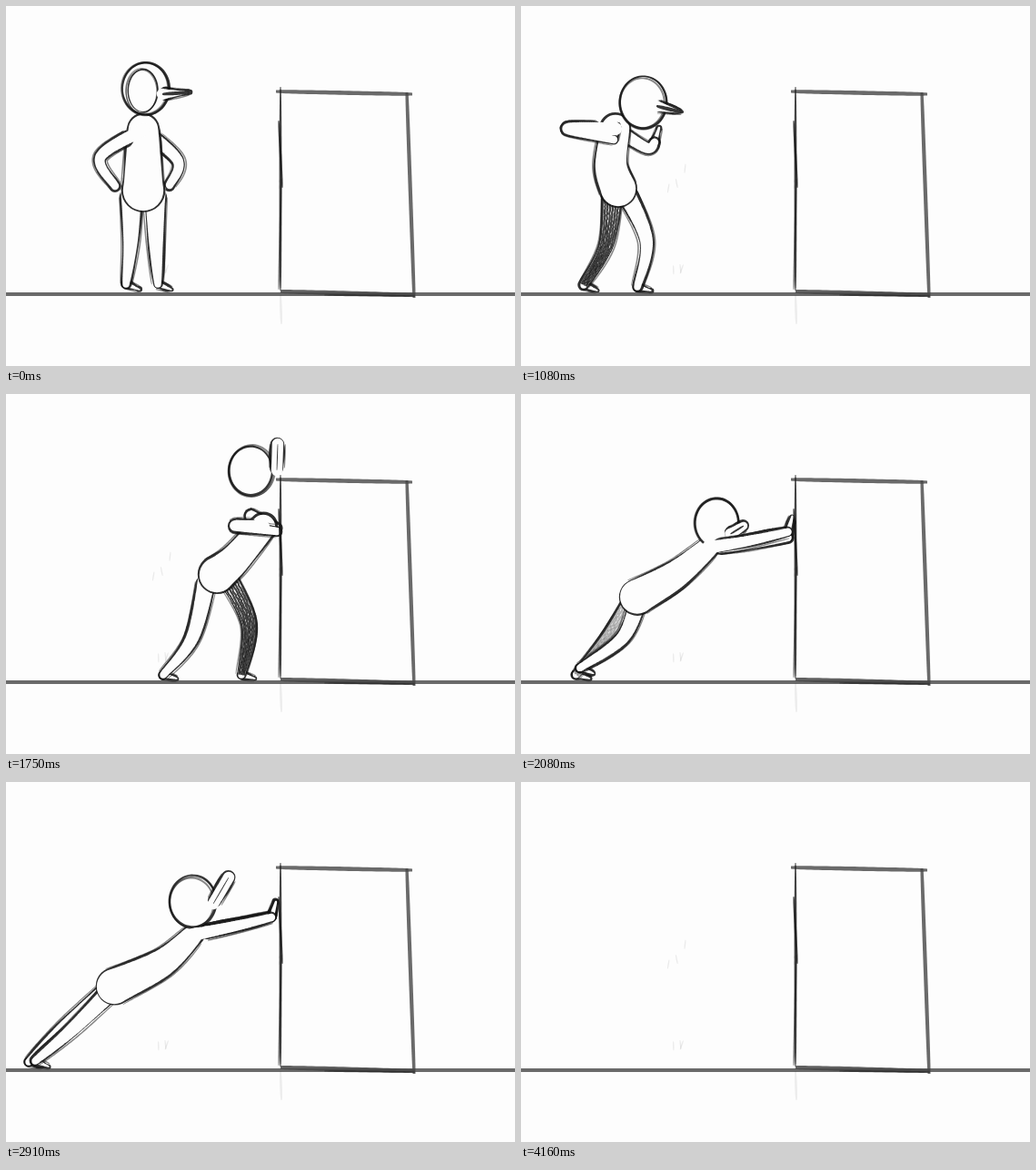
Animation of 560x396 px, one loop 4.66 s. Source, as an HTML page with a canvas:

```html
<!DOCTYPE html>
<html lang="en">
<head>
<meta charset="utf-8">
<title>Pushing the box</title>
<style>
html, body { margin: 0; width: 100%; height: 100%; overflow: hidden; background: #fdfdfd; }
canvas { display: block; width: 100vw; height: 100vh; }
</style>
</head>
<body>
<canvas id="stage" width="560" height="396"></canvas>
<script>
const ctx = document.getElementById('stage').getContext('2d');
const LOOP = 4660;
const PAPER = '#fdfdfd';
const ink = alpha => `rgba(20,20,20,${alpha})`;
const grey = alpha => `rgba(70,70,70,${alpha})`;

let seed = 1;
const random = () => (seed = (seed * 16807) % 2147483647) / 2147483647;
const jitter = size => (random() - 0.5) * 2 * size;

// Blends numbers, arrays and whole poses; t may overshoot 1.
function mix(a, b, t) {
  if (typeof a === 'number') return a + (b - a) * t;
  if (Array.isArray(a)) return a.map((v, i) => mix(v, b[i], t));
  return Object.fromEntries(Object.keys(a).map(k => [k, mix(a[k], b[k], t)]));
}

// ---- Pen ----

// Catmull-Rom curve through the points.
function smooth(points, steps = 36) {
  const at = i => points[Math.max(0, Math.min(points.length - 1, i))];
  const out = [];
  for (let i = 0; i < points.length - 1; i++) {
    const [a, b, c, d] = [at(i - 1), at(i), at(i + 1), at(i + 2)];
    for (let k = 0; k < steps; k++) {
      const t = k / steps;
      out.push([0, 1].map(n => 0.5 * (2 * b[n] + (c[n] - a[n]) * t
        + (2 * a[n] - 5 * b[n] + 4 * c[n] - d[n]) * t * t
        + (3 * b[n] - a[n] - 3 * c[n] + d[n]) * t * t * t)));
    }
  }
  return out.concat([at(points.length - 1)]);
}

// Moves every point sideways by distance(t), t running from 0 to 1.
function offset(line, distance) {
  return line.map(([x, y], i) => {
    const a = line[Math.max(0, i - 1)], b = line[Math.min(line.length - 1, i + 1)];
    const length = Math.hypot(b[0] - a[0], b[1] - a[1]) || 1;
    const d = distance(i / (line.length - 1));
    return [x - (b[1] - a[1]) / length * d, y + (b[0] - a[0]) / length * d];
  });
}

// One brush mark, thinner towards its ends by the share given as taper.
function brush(line, width, color, taper = 0.7) {
  const half = t => width / 2 * (1 - taper + taper * Math.sqrt(Math.sin(Math.PI * t) + 1e-9));
  ctx.beginPath();
  [...offset(line, half), ...offset(line, t => -half(t)).reverse()].forEach(p => ctx.lineTo(...p));
  ctx.fillStyle = color;
  ctx.fill();
}

function sketchEllipse([cx, cy], rx, ry, width) {
  for (let pass = 0; pass < 3; pass++) {
    const start = random() * 6, dx = jitter(1), dy = jitter(1), grow = jitter(1.2);
    const ring = Array.from({ length: 60 }, (_, i) => {
      const a = start + i / 59 * 6.6;
      return [cx + dx + (rx + grow) * Math.cos(a), cy + dy + (ry + grow) * Math.sin(a)];
    });
    brush(ring, width * (pass ? 0.7 : 1), ink(pass ? 0.5 : 0.85));
  }
}

// A soft tube around a bone, left open over its first part so that it joins what lies below.
function tube(bone, [r0, r1], { open = 0, shade = 0 } = {}) {
  const line = smooth(bone);
  const radius = t => r0 + (r1 - r0) * t;
  const phase = random() * 6;
  const discs = (extra, from, dx = 0, dy = 0) => {
    const path = new Path2D();
    line.forEach(([x, y], i) => {
      const t = i / (line.length - 1), r = Math.max(0.3, radius(t) + extra(t));
      if (t < from) return;
      path.moveTo(x + dx + r, y + dy);
      path.arc(x + dx, y + dy, r, 0, 7);
    });
    return path;
  };
  ctx.fillStyle = ink(0.88);
  ctx.fill(discs(t => 1.3 + 0.6 * Math.sin(t * 7 + phase), open, jitter(0.7), jitter(0.7)));
  const visible = line.slice(Math.floor(line.length * open));
  [-1, 1].forEach(side => {
    const gap = 1.2 + random();
    brush(offset(visible, t => side * (radius(open + t * (1 - open)) + gap)), 1.6, ink(0.5));
  });
  const inside = discs(() => -0.8, 0);
  ctx.fillStyle = PAPER;
  ctx.fill(inside);
  if (shade > 0) {
    ctx.save();
    ctx.clip(inside);
    for (let side = -r0; side <= r0; side += 3.2) {
      brush(offset(line, t => side * radius(t) / r0 + jitter(0.5)), 2.4, ink(0.8 * shade), 0.4);
    }
    ctx.restore();
  }
}

// ---- Poses: limbs list the joint and the end, near side first ----

const stand = {
  dx: 0, head: [153, 91], face: 1, beak: [[172, 97], [202, 95]], snout: 1,
  spine: [[151, 136], [151, 170], [151, 203]], girth: [17, 23], hips: -13, shade: 0, palm: 4,
  arms: [[[104, 166], [120, 198]], [[189, 170], [180, 197]]],
  legs: [[[137, 260], [132, 306]], [[165, 260], [167, 306]]],
};
const visit = { ...stand, dx: 59 };
const crouch = {
  dx: 0, head: [134, 106], face: 0, beak: [[149, 110], [177, 117]], snout: 1,
  spine: [[104, 135], [99, 175], [107, 201]], girth: [16, 20], hips: 6, shade: 1, palm: 16,
  arms: [[[51, 135], [102, 147]], [[138, 156], [147, 150]]],
  legs: [[[138, 258], [128, 309]], [[94, 262], [69, 307]]],
};
const push = {
  dx: 0, head: [270, 85], face: 0, beak: [[298, 84], [299, 55]], snout: 7,
  spine: [[283, 146], [252, 182], [232, 199]], girth: [14, 20], hips: -10, shade: 1, palm: 3,
  arms: [[[252, 145], [298, 151]], [[270, 134], [298, 148]]],
  legs: [[[205, 268], [173, 309]], [[267, 253], [259, 309]]],
};
const hunch = {
  dx: 0, head: [231, 157], face: 0, beak: [[234, 184], [245, 205]], snout: 2,
  spine: [[206, 170], [168, 198], [141, 220]], girth: [12, 19], hips: 2, shade: 1, palm: 17,
  arms: [[[242, 167], [296, 156]], [[242, 177], [296, 173]]],
  legs: [[[172, 260], [114, 293]], [[146, 262], [114, 310]]],
};
const stretch = {
  dx: 0, head: [205, 132], face: 0, beak: [[228, 134], [245, 105]], snout: 7,
  spine: [[206, 168], [172, 199], [119, 225]], girth: [11, 20], hips: 2, shade: 0, palm: 17,
  arms: [[[250, 159], [292, 149]], [[250, 158], [292, 148]]],
  legs: [[[72, 273], [32, 307]], [[64, 270], [25, 308]]],
};
const flat = {
  dx: 0, head: [231, 268], face: 0, beak: [[246, 280], [270, 290]], snout: 6,
  spine: [[205, 289], [160, 298], [110, 303]], girth: [15, 11], hips: 0, shade: 0, palm: 0,
  arms: [[[226, 303], [280, 312]], [[228, 300], [278, 310]]],
  legs: [[[50, 307], [-30, 310]], [[50, 305], [-30, 309]]],
};
const pushUp = {
  dx: 0, head: [225, 203], face: 0, beak: [[234, 214], [259, 214]], snout: 7,
  spine: [[205, 246], [165, 277], [118, 296]], girth: [16, 11], hips: 0, shade: 0, palm: 0,
  arms: [[[191, 290], [235, 312]], [[196, 288], [228, 310]]],
  legs: [[[50, 306], [-30, 309]], [[50, 304], [-30, 308]]],
};
const sit = {
  dx: 0, head: [164, 148], face: 0, beak: [[184, 156], [206, 160]], snout: 3,
  spine: [[158, 185], [134, 228], [128, 278]], girth: [14, 22], hips: 4, shade: 0, palm: 4,
  arms: [[[150, 228], [178, 248]], [[185, 220], [188, 244]]],
  legs: [[[176, 252], [174, 306]], [[142, 300], [108, 308]]],
};

// Each drawing is held until the next: start, pose, and optionally a second pose to blend towards.
const timeline = [
  [0, stand], [330, visit, push, 0.7], [500, visit, push, 0.35], [660, visit],
  [910, visit, crouch, 0.75], [1080, crouch], [1250, visit, crouch, 1.15],
  [1410, crouch, push, 0.6], [1580, crouch, push, 0.88], [1750, push],
  [1910, push, stretch, 0.97], [2080, stretch, hunch, 0.4], [2250, stretch, hunch, 0.75], [2410, hunch],
  [2580, hunch, stretch, 0.95], [2750, hunch, stretch, 1.05], [2910, stretch],
  [3080, stretch, flat, 0.45], [3250, stretch, flat, 0.9], [3410, flat], [3580, pushUp],
  [3750, sit], [4160, null],
];

// ---- Drawing ----

function drawArm(shoulder, [elbow, hand], palm) {
  const open = 0.2;
  if (palm > 8) tube([hand, [hand[0] + 5, hand[1] - palm]], [4, 2]);
  tube([shoulder, elbow, hand], [8, 5], { open });
}

function drawLeg(hip, [knee, ankle], thigh, shade) {
  const toe = [ankle[0] + 15, Math.min(ankle[1] + 6, 313)];
  tube([ankle, toe], [4, 1.5]);
  tube([hip, knee, ankle], [thigh, 4.5], { open: 0.1, shade });
}

function drawFigure({ dx, head, face, beak, snout, spine, girth, hips, shade, palm, arms, legs }) {
  const [shoulder, , pelvis] = spine;
  const hip = side => [pelvis[0] + hips * side, pelvis[1]];
  const thigh = girth[1] * 0.55;
  ctx.save();
  ctx.translate(dx, 0);
  drawArm(shoulder, arms[1], palm);
  drawLeg(hip(-1), legs[1], thigh, shade);
  drawLeg(hip(1), legs[0], thigh, 0);
  tube(spine, girth);

  ctx.beginPath();
  ctx.ellipse(...head, 25, 28, 0, 0, 7);
  ctx.fillStyle = PAPER;
  ctx.fill();
  sketchEllipse(head, 25, 28, 2.8);
  if (face > 0.5) sketchEllipse([head[0] - 3, head[1] + 3], 17, 24, 1.8);
  tube(beak, [7, snout], { open: 0.15 });
  brush(smooth(beak), 4.5 - snout / 2, ink(0.85));

  drawArm(shoulder, arms[0], palm);
  ctx.restore();
}

function drawSet() {
  const stroke = (from, to, width, color, taper) => brush(smooth([from, to]), width, color, taper);
  stroke([-9, 317], [569, 317], 4, grey(0.8), 0);
  stroke([297, 94], [447, 97], 4.6, grey(0.8), 0.4);
  stroke([441, 95], [449, 321], 4.2, grey(0.8), 0.3);
  stroke([302, 314], [450, 318], 5, grey(0.85), 0.3);
  stroke([350, 318], [450, 319], 2, ink(0.5));
  stroke([302, 89], [302, 313], 2.8, ink(0.8));
  stroke([300, 126], [304, 200], 2.4, ink(0.8));
  stroke([303, 190], [300, 312], 2, ink(0.6));
  stroke([302, 318], [303, 350], 2.5, ink(0.07));
}

// Faint leftovers of erased lines.
function drawSmudges() {
  for (let i = 0; i < 6; i++) {
    const x = 163 + random() * 22, y = (i % 2 ? 262 : 166) + random() * 32;
    brush(smooth([[x, y], [x + jitter(4), y + 10]]), 1.4, ink(0.08));
  }
}

function draw([start, pose, next, blend]) {
  ctx.fillStyle = PAPER;
  ctx.fillRect(0, 0, 560, 396);
  seed = 7;
  drawSmudges();
  seed = start + 17;
  if (pose) drawFigure(next ? mix(pose, next, blend) : pose);
  drawSet();
}

let shown;
function tick() {
  const time = performance.now() % LOOP;
  const current = timeline.filter(([start]) => start <= time).pop();
  if (current !== shown) draw(shown = current);
  requestAnimationFrame(tick);
}
tick();
</script>
</body>
</html>
```
